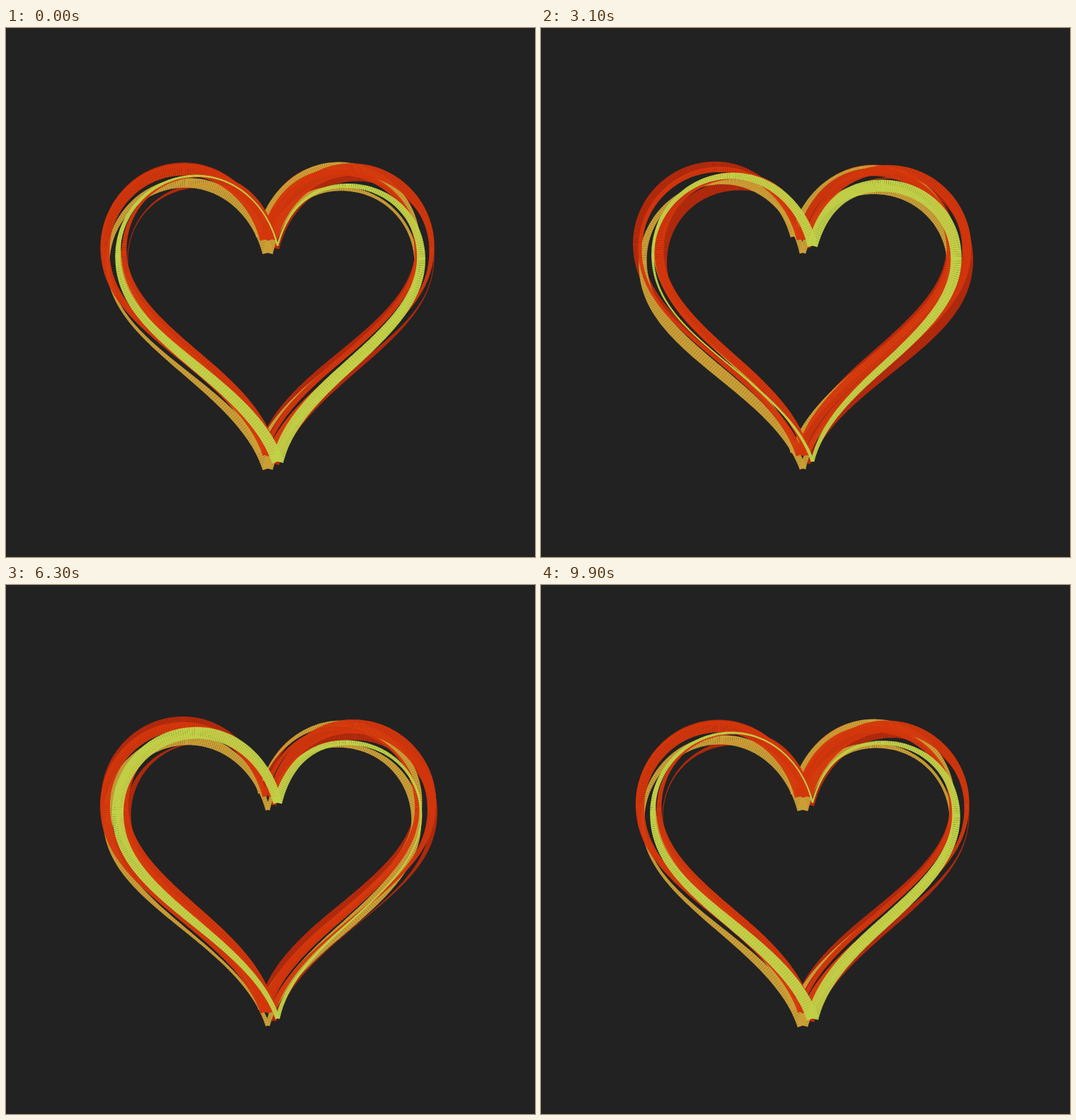
These frames come from a looping animation (748 px wide and 748 px high, 10000 ms). An HTML page with a canvas:

```html
<!DOCTYPE html>
<html lang="en">
<head>
<meta charset="utf-8">
<title>Ribbon heart</title>
<style>
html, body { margin: 0; width: 100%; height: 100%; overflow: hidden; background: #222; }
canvas { display: block; }
</style>
</head>
<body>
<canvas id="stage" width="748" height="748"></canvas>
<script>
const ctx = document.getElementById('stage').getContext('2d');
const LOOP = 10000, STEP = 100, CURVES = 8, SLICES = 56;
const wave = turns => Math.cos(2 * Math.PI * turns);

// Closed Bezier outline around the upper notch: large lobe down, small lobe back up.
const OUTLINE = [
  [0, 0], [-14, -58], [-60, -99], [-114, -99], [-176, -99], [-226, -48], [-226, 13],
  [-226, 70], [-190, 108], [-134, 155], [-80, 200], [-20, 245], [0, 305],
  [10, 262], [40, 224], [96, 174], [150, 125], [203, 78], [203, 18],
  [203, -42], [156, -85], [98, -85], [48, -85], [14, -54], [0, 0]
];

const DARK = '#b62a0c', RED = '#d4360c', GOLD = '#cb9f36', GREEN = '#c0d148';

// Each strand is the outline at its own notch; side -1 mirrors it, small scales the smaller lobe.
// Its width is base + a fixed bulge + a wave running along it: cycles per loop, crests per lap.
const strands = [
  { color: DARK, x: 363, y: 293, side: 1, small: 1.07,
    base: 8, bulge: 3, sway: 6, cycles: 2, crests: 2, phase: 0.1 },
  { color: DARK, x: 379, y: 311, side: -1, small: 1.02,
    base: 8, bulge: 0, sway: 7, cycles: 2, crests: 2, phase: -0.03 },
  { color: GOLD, x: 357, y: 295, side: -1, small: 0.97,
    base: 6, bulge: 2, sway: 5, cycles: 2, crests: 2, phase: -0.22 },
  { color: GOLD, x: 370, y: 318, side: 1, small: 1.035,
    base: 10, bulge: 0, sway: 6, cycles: 2, crests: 2, phase: 0.9 },
  { color: RED, x: 366, y: 299, side: 1, small: 1.06,
    base: 10, bulge: 2, sway: 5, cycles: 2, crests: 1, phase: -0.1 },
  { color: RED, x: 376, y: 299, side: -1, small: 1.03,
    base: 11, bulge: 5, sway: 4, cycles: 2, crests: 2, phase: -0.05 },
  { color: GREEN, x: 384, y: 308, side: 1, small: 1,
    base: 9.5, bulge: 0, sway: 7.5, cycles: 1, crests: 1, phase: 0.45 }
];

function place({ x, y, side, small }, [px, py], inSmallLobe) {
  const sx = inSmallLobe ? small : 1;
  const sy = inSmallLobe && py < 0 ? 2 * small - 1 : 1;
  return [x + side * px * sx, y + py * sy];
}

function bezier([a, b, c, d], u) {
  const v = 1 - u;
  const at = i => v * v * v * a[i] + 3 * v * v * u * b[i] + 3 * v * u * u * c[i] + u * u * u * d[i];
  const slope = i => v * v * (b[i] - a[i]) + 2 * v * u * (c[i] - b[i]) + u * u * (d[i] - c[i]);
  const dx = slope(0), dy = slope(1), length = Math.hypot(dx, dy);
  return { x: at(0), y: at(1), nx: -dy / length, ny: dx / length };
}

for (const strand of strands) {
  strand.curves = Array.from({ length: CURVES }, (_, k) => {
    const points = OUTLINE.slice(3 * k, 3 * k + 4).map(p => place(strand, p, k >= CURVES / 2));
    return Array.from({ length: SLICES + 1 }, (_, i) => bezier(points, i / SLICES));
  });
}

function widthAt({ base, bulge, sway, cycles, crests, phase }, lap, turn) {
  const width = base + bulge * wave(2 * lap - 0.25) + sway * wave(cycles * turn - crests * lap - phase);
  return Math.max(0, width);
}

function drawStrand(strand, turn) {
  ctx.fillStyle = strand.color;
  strand.curves.forEach((samples, k) => {
    const edges = samples.map(({ x, y, nx, ny }, i) => {
      const half = widthAt(strand, (k + i / SLICES) / CURVES, turn) / 2;
      return [x + nx * half, y + ny * half, x - nx * half, y - ny * half];
    });
    for (let i = 0; i < SLICES; i++) {
      const p = edges[i], q = edges[i + 1];
      ctx.beginPath();
      ctx.moveTo(p[0], p[1]);
      ctx.lineTo(q[0], q[1]);
      ctx.lineTo(q[2], q[3]);
      ctx.lineTo(p[2], p[3]);
      ctx.fill();
    }
  });
}

function draw(time) {
  ctx.fillStyle = '#222';
  ctx.fillRect(0, 0, 748, 748);
  strands.forEach(strand => drawStrand(strand, time / LOOP));
}

const start = performance.now();
let shown = -1;
function tick() {
  const elapsed = Math.max(0, performance.now() - start) % LOOP;
  const time = Math.floor(elapsed / STEP) * STEP;
  if (time !== shown) draw(shown = time);
  requestAnimationFrame(tick);
}
tick();
</script>
</body>
</html>
```
